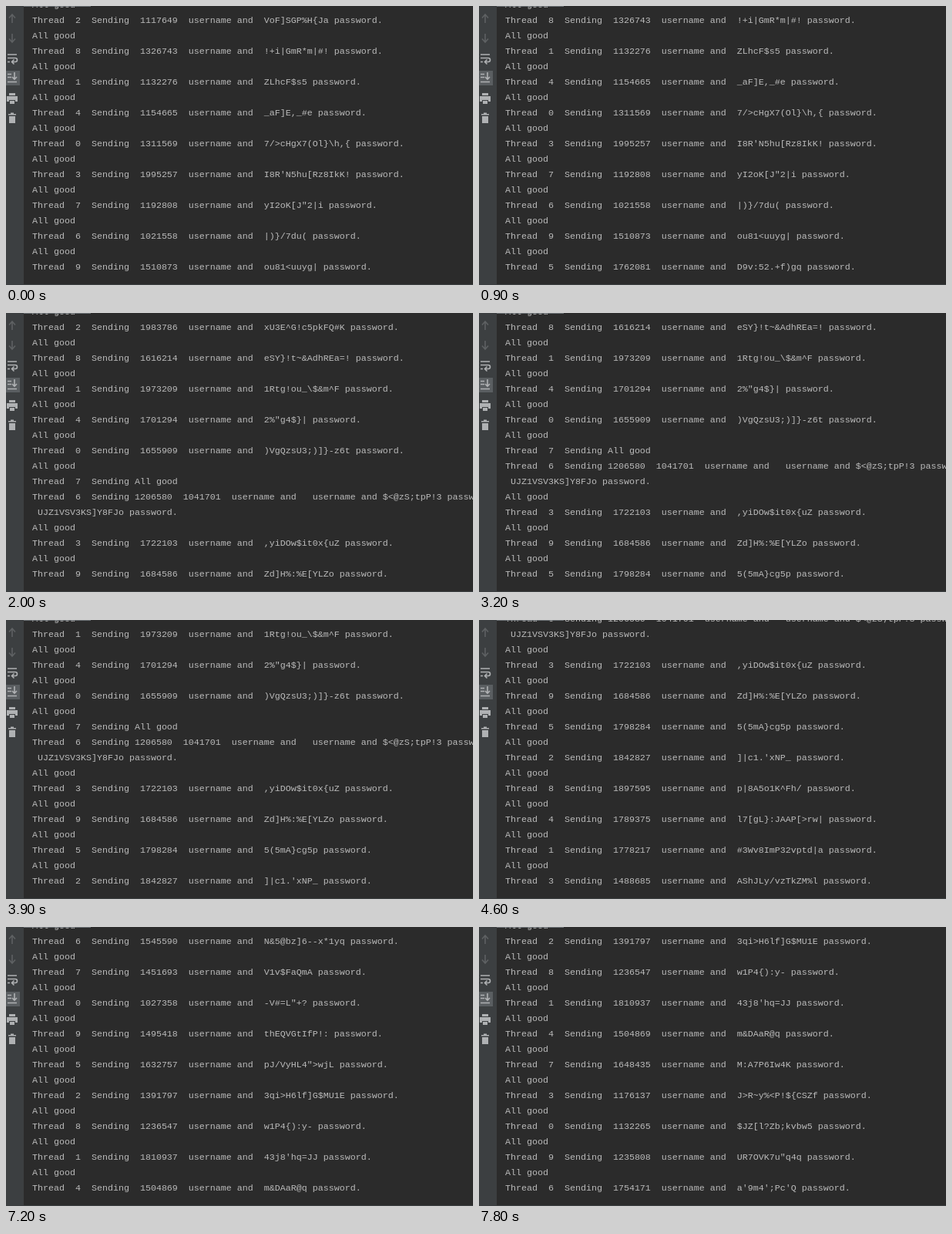
Animation, 606 px wide and 362 px high, one loop 7.9 s. Source, as an HTML page:

```html
<!DOCTYPE html>
<html lang="en">
<head>
<meta charset="utf-8">
<title>Console log</title>
<style>
  html, body { margin: 0; width: 100%; height: 100%; overflow: hidden; background: #2b2b2b; }
  #stage { position: relative; width: 606px; height: 362px; overflow: hidden; background: #2b2b2b; }
  #log {
    position: absolute; left: 34px; top: -11px; margin: 0;
    font: 11.665px/20px "Liberation Mono", "DejaVu Sans Mono", monospace;
    font-variant-ligatures: none; white-space: pre; color: #bbb;
  }
  svg { position: absolute; left: 0; top: 0; }
</style>
</head>
<body>
<div id="stage">
  <pre id="log"></pre>
  <svg width="606" height="362" fill="none" stroke-width="1.6">
    <path d="M0 0h23v362H0z" fill="#3c3f41"/>
    <path d="M23 0h87v1H23z" fill="#6a6f73"/>
    <path d="M0 361h606v1H0z" fill="#3c3f41"/>
    <path d="M0 84h18v19H0z" fill="#5a5e61"/>
    <g stroke="#5e6163">
      <path id="arrow" d="M8 22V11M4 15.5l4-4.5 4 4.5"/>
      <use href="#arrow" transform="matrix(1 0 0 -1 0 58)"/>
    </g>
    <g stroke="#afb1b3">
      <path d="M2 63h12M2 67.5h10a2.500 2.500 0 0 1 0 5H8M2 72.500h3M10.500 69.500l-3 3 3 3"/>
      <path d="M2 88.500h5M2 92.500h5M2 98.500h12M11 86v9M8 92l3 3 3-3"/>
    </g>
    <g fill="#afb1b3">
      <path d="M4 113h8v3H4zM1 117h14v7h-3v-2H4v2H1zM5 123h6v4H5z"/>
      <path d="M3 140h10v1.500H3zM6 138.500h4V140H6zM4 143h8v9H4z"/>
    </g>
  </svg>
</div>
<!-- Thread and password of each request; a blank line stands for two threads printing at once. -->
<script type="text/plain" id="requests">2 VoF]SGP%H{Ja
8 !+i|GmR*m|#!
1 ZLhcF$s5
4 _aF]E,_#e
0 7/>cHgX7(Ol}\h,{
3 I8R'N5hu[Rz8IkK!
7 yI2oK[J"2|i
6 |)}/7du(
9 ou81<uuyg|
5 D9v:52.+f)gq
2 xU3E^G!c5pkFQ#K
8 eSY}!t~&AdhREa=!
1 1Rtg!ou_\$&m^F
4 2%"g4$}|
0 )VgQzsU3;)]}-z6t

3 ,yiDOw$it0x{uZ
9 Zd]H%:%E[YLZo
5 5(5mA}cg5p
2 ]|c1.'xNP_
8 p|8A5o1K^Fh/
4 l7[gL}:JAAP[>rw|
1 #3Wv8ImP32vptd|a
3 AShJLy/vzTkZM%l
6 N&5@bz]6--x*1yq
7 V1v$FaQmA
0 -V#=L"+?
9 thEQVGtIfP!:
5 pJ/VyHL4">wjL
2 3qi>H6lf]G$MU1E
8 w1P4{):y-
1 43j8'hq=JJ
4 m&DAaR@q
7 M:A7P6Iw4K
3 J>R~y%<P!${CSZf
0 $JZ[l?Zb;kvbw5
9 UR7OVK7u"q4q
6 a'9m4';Pc'Q</script>
<script>
const LOOP = 7900, VISIBLE = 18, THREADS = 10;

let seed = 7;
function userNumber() {
  seed = (seed * 16807) % 2147483647;
  return 1000000 + seed % 1000000;
}

function requestLines(request) {
  if (!request) return [
    "All good",
    "Thread  7  Sending All good",
    `Thread  6  Sending ${userNumber()}  ${userNumber()}  username and   username and $<@zS;tpP!3 password.`,
    " UJZ1VSV3KS]Y8FJo password."
  ];
  const [thread, password] = request.split(" ");
  return ["All good", `Thread  ${thread}  Sending  ${userNumber()}  username and  ${password} password.`];
}

const lines = document.getElementById("requests").textContent.split("\n").flatMap(requestLines);

// In each burst the threads report at an even pace; the last one lags two steps more.
const bursts = [
  { start: 1030, step: 120 },
  { start: 3800, step: 200 },
  { start: 6700, step: 135 }
];
const arrivals = bursts.flatMap(({ start, step }) =>
  Array.from({ length: THREADS }, (_, i) =>
    (start + step * (i < THREADS - 1 ? i : i + 2)) % LOOP));

const log = document.getElementById("log");
const begin = performance.now();
let shown = -1;

function draw(now) {
  const t = Math.max(0, now - begin) % LOOP;
  const top = 2 * arrivals.filter(at => at <= t).length;
  if (top !== shown) {
    log.textContent = lines.slice(top, top + VISIBLE).join("\n");
    shown = top;
  }
  requestAnimationFrame(draw);
}
draw(begin);
</script>
</body>
</html>
```
